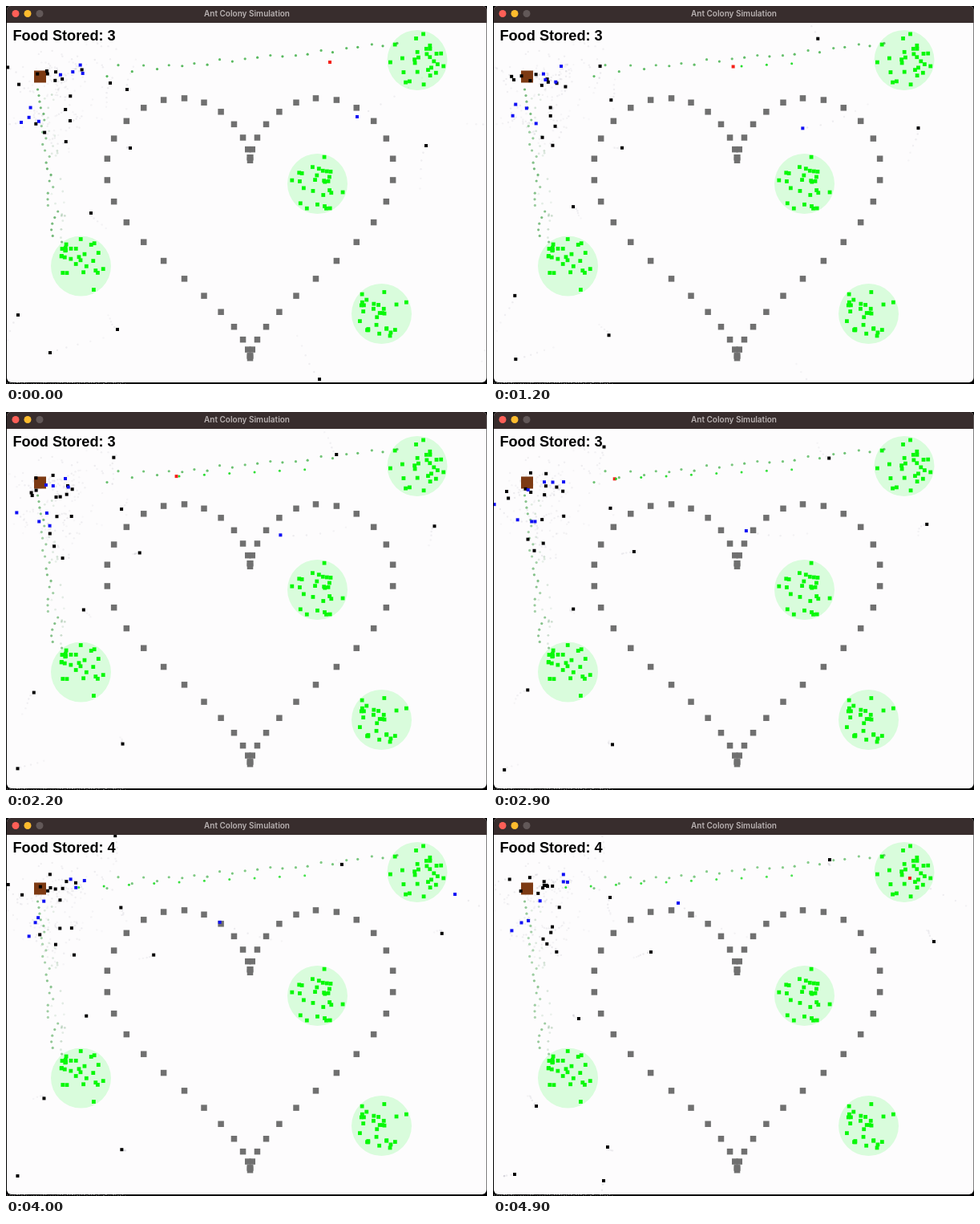
Animation, 600 px wide and 471 px high, one loop 5 s. Source, as an HTML page with a canvas:

```html
<!DOCTYPE html>
<html lang="en">
<head>
<meta charset="utf-8">
<title>Ant Colony Simulation</title>
<style>
html, body { margin: 0; width: 100%; height: 100%; overflow: hidden; background: #000; }
canvas { display: block; width: 600px; height: 471px; }
</style>
</head>
<body>
<canvas id="stage" width="600" height="471"></canvas>
<script>
const ctx = document.getElementById('stage').getContext('2d');
const LOOP = 5, STEP = 0.1, LAST = LOOP - STEP, DROP = 0.36;
const ARRIVE = 3.93, PICKUP = 4.75;
const FIELD = { x: 1, y: 21, w: 598, h: 448 };
const NEST = { x: 42.5, y: 88 };
const PATCHES = [[513, 67.5], [388.5, 221.5], [93.5, 324], [468.5, 383.5]];
const BLACK = '#000', BLUE = '#1010f5', RED = '#f52018';

function random(seed) {
  return () => {
    seed = (seed * 1664525 + 1013904223) % 4294967296;
    return seed / 4294967296;
  };
}

function square(x, y, size, color) {
  ctx.fillStyle = color;
  ctx.fillRect(x - size / 2, y - size / 2, size, size);
}

function dot(x, y, r, color, alpha = 1) {
  ctx.globalAlpha = alpha;
  ctx.fillStyle = color;
  ctx.beginPath();
  ctx.arc(x, y, r, 0, Math.PI * 2);
  ctx.fill();
  ctx.globalAlpha = 1;
}

const wrap = (v, start, size) => start + (((v - start) % size) + size) % size;

// Each ant has a colour and a path: time -> [x, y], wrapped at the field edges
const ants = [];
function ant(color, path) {
  const at = t => {
    const [x, y] = path(t);
    return [wrap(x, FIELD.x, FIELD.w), wrap(y, FIELD.y, FIELD.h)];
  };
  const a = { color, at };
  ants.push(a);
  return a;
}

// A curve from start to end that passes a given point halfway
function roamer(color, [x0, y0], [xm, ym], [x1, y1]) {
  const curve = (a, m, b, u) => a * (1 - u) * (1 - 2 * u) + 4 * m * u * (1 - u) + b * u * (2 * u - 1);
  return ant(color, t => {
    const u = t / LAST;
    return [curve(x0, xm, x1, u) + 2 * Math.sin(4 * Math.PI * u), curve(y0, ym, y1, u)];
  });
}

// Ants milling around a spot
function crowd(color, count, x, y, spreadX, spreadY, rnd) {
  for (let i = 0; i < count; i++) {
    const hx = x + (rnd() + rnd() - 1) * spreadX, hy = y + (rnd() + rnd() - 1) * spreadY;
    const reach = 6 + rnd() * 12, rate = 1 + rnd() * 1.2, phase = rnd() * 6.3;
    ant(color, t => [
      hx + reach * Math.sin(rate * t + phase),
      hy + reach * 0.8 * Math.cos(rate * 0.8 * t + phase * 2)
    ]);
  }
}

roamer(BLACK, [524, 174], [537, 141], [550, 154]);
roamer(BLACK, [391, 465], [415, 503], [420, 500]);
roamer(BLACK, [15, 385], [38, 348], [54, 359]);
roamer(BLACK, [139, 403], [147, 414], [143, 410]);
roamer(BLACK, [55, 432], [14, 445], [27, 444]);
roamer(BLACK, [106, 258], [98, 246], [107, 250]);
roamer(BLACK, [155, 177], [170, 175], [197, 167]);
roamer(BLACK, [130, 96], [136, 52], [138, 4]);
roamer(BLACK, [151, 104], [145, 121], [146, 99]);
roamer(BLUE, [438, 138], [333, 152], [231, 106]);
crowd(BLACK, 8, 72, 88, 48, 26, random(21));
crowd(BLACK, 5, 68, 150, 22, 26, random(8));
crowd(BLACK, 2, 28, 90, 18, 14, random(3));
crowd(BLUE, 4, 80, 88, 32, 16, random(14));
crowd(BLUE, 3, 44, 130, 20, 10, random(6));
const finder = roamer(BLUE, [19, 145], [10, 122], [-78, 75]);
const carrier = ant(RED, t => {
  const s = Math.min(t, ARRIVE);
  return [404 - 87 * s - 6 * (t - s), 70 + 4.6 * s + 6 * (t - s)];
});

function colorOf(a, t) {
  if (a === carrier && t >= ARRIVE) return BLACK;
  if (a === finder && t >= PICKUP) return RED;
  return a.color;
}

function drawWindow() {
  ctx.fillStyle = '#000';
  ctx.fillRect(0, 0, 600, 471);
  const rnd = random(5);
  ctx.fillStyle = '#777';
  for (let x = 1; x < 150; x += 3) ctx.fillRect(x, 469 + rnd() * 1.5, 1 + rnd(), 1);
  ctx.save();
  ctx.beginPath();
  ctx.roundRect(1, 0, 598.5, 469, [5, 5, 6, 6]);
  ctx.clip();
  ctx.fillStyle = '#fdfcfd';
  ctx.fillRect(0, 0, 600, 471);
  ctx.fillStyle = '#382d2d';
  ctx.fillRect(0, 0, 600, 21);
  ctx.restore();
  ['#fe5f57', '#febc2e', '#625858'].forEach((c, i) => dot(12 + 15 * i, 9.5, 4.5, c));
  ctx.fillStyle = '#b9b2b2';
  ctx.font = '600 10px Inter, sans-serif';
  ctx.textAlign = 'center';
  ctx.fillText('Ant Colony Simulation', 300.5, 13);
}

// Two lanes towards the east patch and one loose lane south
function drawTrails(t) {
  const rnd = random(17), fade = 1 - 0.05 * t;
  for (let i = 0; i < 12; i++) {
    const u = i / 11, jitter = () => (rnd() - 0.5) * 5;
    dot(140 + 348 * u, 75 - 30 * u ** 1.5 + jitter(), 1.6, '#2ea836', 0.75 * fade);
    dot(126 + 344 * u, 86 - 36 * u + jitter(), 1.6, '#2ea836', 0.8 * fade);
  }
  for (let i = 0; i < 26; i++) {
    const u = i / 25;
    const x = 42 + 20 * u + (rnd() - 0.5) * (5 + 11 * u);
    dot(x, 104 + 190 * u, 1.6, '#3a9c42', (0.5 + 0.3 * rnd()) * fade);
  }
}

function drawScent(t) {
  const rnd = random(11);
  for (let i = 0; i < 60; i++) {
    const x = 80 + (rnd() + rnd() - 1) * 75, y = 100 + (rnd() + rnd() - 1) * 75;
    dot(x, y, 1.2, '#777788', 0.04 + rnd() * 0.08);
  }
  for (let i = 0; i < 24; i++) {
    const u = rnd();
    dot(44 + 16 * u + rnd() * 18, 105 + 185 * u, 1.4, '#4f8f58', 0.1 + rnd() * 0.2);
  }
  for (const a of ants) {
    if (a === carrier) continue;
    for (let k = 0; k < 6; k++) {
      const [x, y] = a.at((Math.floor(t / DROP) - k) * DROP);
      dot(x, y, 1.2, '#666677', 0.13 - k * 0.016);
    }
  }
}

function drawFood() {
  const rnd = random(29);
  for (const [px, py] of PATCHES) {
    dot(px, py, 37.5, '#d9fcdc');
    for (let i = 0; i < 28; i++) {
      const r = 35 * rnd() ** 0.65, a = rnd() * Math.PI * 2;
      square(px + r * Math.cos(a), py + r * Math.sin(a), 4.8, '#08f808');
    }
  }
}

function drawHeart() {
  for (let k = 0; k < 50; k++) {
    const a = k * Math.PI / 25;
    const hx = 16 * Math.sin(a) ** 3;
    const hy = 13 * Math.cos(a) - 5 * Math.cos(2 * a) - 2 * Math.cos(3 * a) - Math.cos(4 * a);
    square(304.5 + 11.2 * hx, 248.3 - 11.2 * hy, 7.5, '#707070');
  }
}

function draw(t) {
  drawWindow();
  ctx.save();
  ctx.beginPath();
  ctx.rect(FIELD.x, FIELD.y, FIELD.w, FIELD.h);
  ctx.clip();
  drawFood();
  drawTrails(t);
  drawScent(t);
  drawHeart();
  square(NEST.x, NEST.y, 15, '#7d3a13');
  for (const a of ants) square(...a.at(t), 4, colorOf(a, t));
  for (let k = 1; k * DROP <= Math.min(t, ARRIVE); k++) {
    dot(...carrier.at(k * DROP), 1.5, '#18dc20', 0.95 - 0.04 * (t - k * DROP));
  }
  ctx.restore();
  ctx.fillStyle = '#000';
  ctx.font = 'bold 18.2px "Liberation Sans", Arial, sans-serif';
  ctx.textAlign = 'left';
  ctx.fillText('Food Stored: ' + (t < ARRIVE ? 3 : 4), 8.4, 42.5);
}

const began = performance.now();
function frame() {
  const s = ((performance.now() - began) / 1000) % LOOP;
  draw(Math.floor(s / STEP + 1e-6) * STEP);
  requestAnimationFrame(frame);
}
frame();
</script>
</body>
</html>
```
